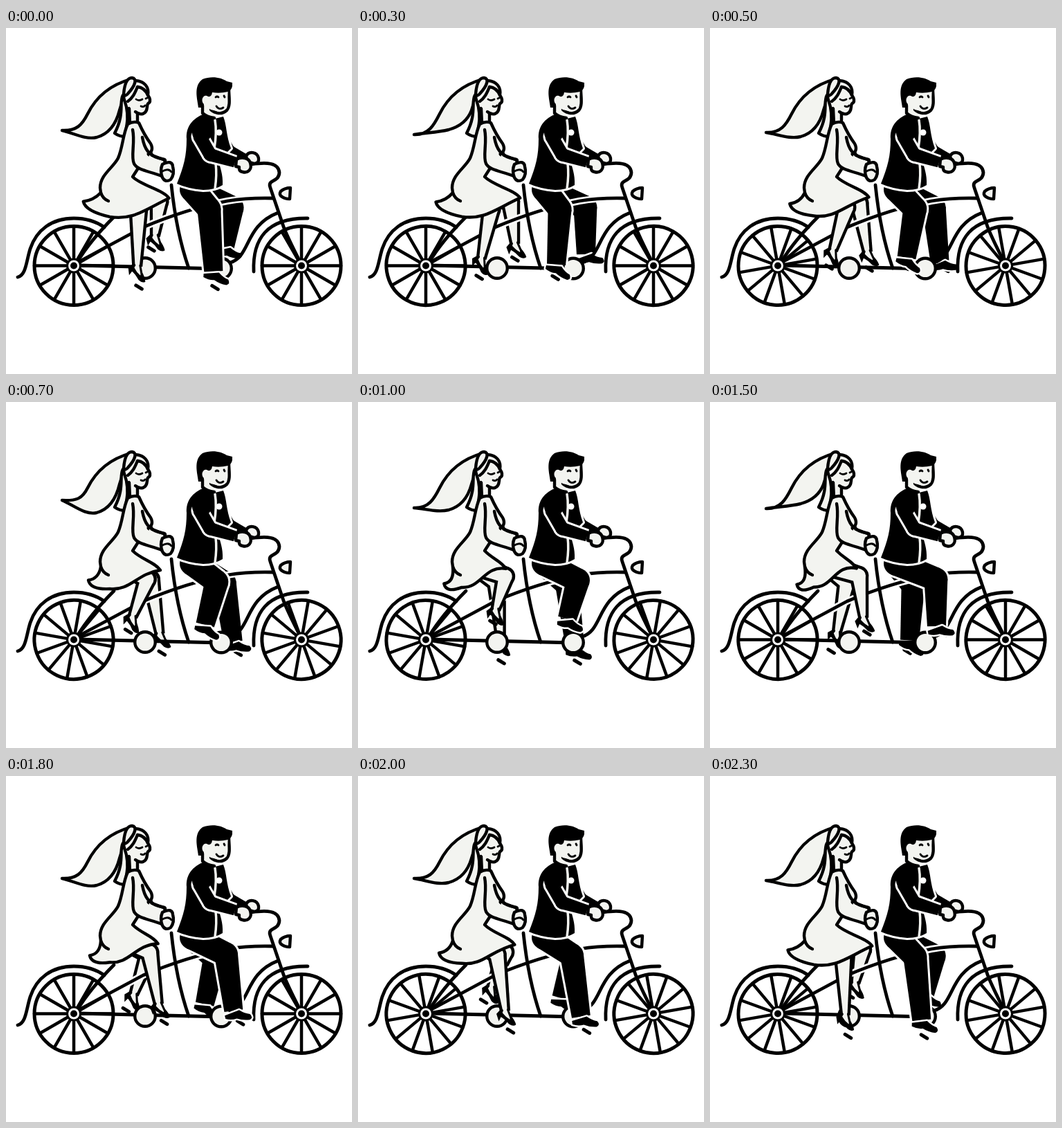
An HTML page with a canvas that plays this animation: 500x500 px, repeating every 2.4 s.

```html
<!DOCTYPE html>
<html lang="en">
<head>
<meta charset="utf-8">
<title>Tandem wedding ride</title>
<style>
html, body { margin: 0; width: 100%; height: 100%; overflow: hidden; background: #fff; }
canvas { display: block; width: 500px; height: 500px; }
</style>
</head>
<body>
<canvas id="stage" width="500" height="500"></canvas>
<script>
const ctx = document.getElementById('stage').getContext('2d');
const INK = '#000', PAPER = '#fff', CLOTH = '#f3f4f0', LINE = 4.4, TUBE = 4.8;
const STEP = 100, STEPS = 24, TURN = Math.PI * 2;
const REAR_HUB = [98, 343.5], FRONT_HUB = [427, 343.5];
const REAR_CRANK = [201, 347], FRONT_CRANK = [311, 347.5];

ctx.lineCap = ctx.lineJoin = 'round';

function fill(d, color) {
  ctx.fillStyle = color;
  ctx.fill(new Path2D(d));
}
function stroke(d, width = LINE, color = INK) {
  ctx.lineWidth = width;
  ctx.strokeStyle = color;
  ctx.stroke(new Path2D(d));
}
function shape(d, color, width) {
  fill(d, color);
  stroke(d, width);
}
function disc(x, y, r, color) {
  ctx.fillStyle = color;
  ctx.beginPath();
  ctx.arc(x, y, r, 0, TURN);
  ctx.fill();
}
function at(x, y, angle, draw) {
  ctx.save();
  ctx.translate(x, y);
  ctx.rotate(angle);
  draw();
  ctx.restore();
}

// Tapered chain of [x, y, radius] joints; the last end is cut flat.
function limb(joints, color, grow = 0) {
  ctx.fillStyle = color;
  for (let i = 0; i < joints.length - 1; i++) {
    const [x, y, r] = joints[i], [u, v, s] = joints[i + 1];
    const a = Math.atan2(v - y, u - x), nx = -Math.sin(a), ny = Math.cos(a);
    const p = r + grow, q = s + grow;
    ctx.beginPath();
    ctx.moveTo(x + nx * p, y + ny * p);
    ctx.lineTo(u + nx * q, v + ny * q);
    ctx.lineTo(u - nx * q, v - ny * q);
    ctx.lineTo(x - nx * p, y - ny * p);
    ctx.fill();
    disc(x, y, p, color);
  }
}

const pedalAngle = n => (108 + 15 * n) * Math.PI / 180;
const swing = (n, peak) => Math.cos((n - peak) * TURN / STEPS);

function pedal([x, y], a) {
  at(x + 29 * Math.cos(a), y + 29 * Math.sin(a), 0.55, () => stroke('M-5 0H5', 5));
}

function brideLeg(n, dx, dy) {
  const a = pedalAngle(n), k = swing(n, 13);
  const x = 200 + dx + 23 * Math.cos(a + 0.15), y = 323 + dy + 23 * Math.sin(a);
  const leg = [[172, 237, 16], [204 + dx + 13 * k, 256 - 6 * k, 14], [x, y, 7.5]];
  pedal(REAR_CRANK, a);
  limb(leg, INK);
  limb(leg, CLOTH, -LINE);
  at(x, y, -0.2 * Math.cos(a), () => {
    shape('M-4 -2L-8 5Q2 10 9 19L4 -2', CLOTH, 3);
    fill('M-7 -3L-13 2L-11 13L-7 7Q-1 12 3 19Q9 24 13 21Q12 14 7 7L5 13Q0 9 -7 -3Z', INK);
  });
}

function groomLeg(n, dx, dy) {
  const a = pedalAngle(n), k = swing(n, 14);
  const x = 307 + dx + 23 * Math.cos(a), y = 333 + dy + 20 * Math.sin(a);
  const leg = [[269, 233, 18], [309 + dx + 18 * k, 259 + dy - 3 * k, 17], [x, y, 13.5]];
  const shoe = 'M-14 4L8 1Q15 8 22 10Q26 16 20 18Q10 17 2 12Q-6 13 -14 9Z';
  pedal(FRONT_CRANK, a);
  limb(leg, PAPER, 3);
  limb(leg, INK);
  at(x, y, -0.24 * Math.cos(a), () => {
    stroke(shoe, 5, PAPER);
    fill(shoe, INK);
  });
}

function wheel([x, y], n) {
  at(x, y, n * TURN / 36, () => {
    for (let i = 0; i < 6; i++) {
      const c = 57 * Math.cos(i * TURN / 12), s = 57 * Math.sin(i * TURN / 12);
      stroke(`M${-c} ${-s}L${c} ${s}`, 4.5);
    }
    ctx.lineWidth = 5;
    ctx.beginPath();
    ctx.arc(0, 0, 57, 0, TURN);
    ctx.stroke();
  });
}
function hub([x, y]) {
  disc(x, y, 11, INK);
  disc(x, y, 8, PAPER);
  disc(x, y, 5, INK);
}
function ring([x, y]) {
  disc(x, y, 17, INK);
  disc(x, y, 12.6, CLOTH);
}

function bike(n) {
  const tube = 'M103 339L198 288Q262 261 320 250Q350 245 386 246';
  stroke(tube, 10, PAPER);
  wheel(REAR_HUB, n);
  wheel(FRONT_HUB, n);
  stroke(tube, TUBE);
  stroke('M103 338Q122 307 156 273', TUBE);
  stroke('M104 343L312 348', TUBE);
  stroke('M239 227Q246 295 264 347', TUBE);
  stroke('M17 360C29 357 29 338 35 319C44 292 66 275 98 275Q124 275 142 288', TUBE);
  stroke('M358 352C356 305 377 274 436 275', TUBE);
  stroke('M324 339C354 330 344 286 393 267', TUBE);
  stroke('M354 197C376 194 394 194 395 209C394 224 377 218 382 231L400 284Q404 297 427 342', TUBE);
  shape('M397 236Q403 231 411 231L410 247Q403 247 399 244Q394 241 397 236Z', CLOTH);
  hub(REAR_HUB);
  hub(FRONT_HUB);
  ring(REAR_CRANK);
  ring(FRONT_CRANK);
}

function veil(n) {
  const i = n % 6;
  const tip = [148, 142, 148, 154, 153, 151][i];
  const belly = [158, 160, 154, 147, 156, 157][i];
  shape(`M180 74C144 84 127 106 118 124C110 140 102 ${tip + 1} 81 ${tip}
    C98 ${tip + (belly - tip) * 0.4} 115 ${belly + 4} 131 ${belly}Q156 ${belly - 7} 164 119L172 94Z`, CLOTH);
  shape('M169 97C163 108 172 124 157 152Q164 157 172 157C173 144 178 134 174 114Z', CLOTH);
}

function bride(n) {
  const c = swing(n, 1);
  const tx = 119 - 7.5 * c, ty = 257.5 - 7 * c;
  const ex = 223 + 13 * c, ey = 243 + 3 * c;

  veil(n);
  // far arm
  shape('M203 166L211 184L230 191L229 201L205 193Z', CLOTH);
  // neck and dress
  fill('M178 116L179 140L192 140L190 120Z', CLOTH);
  stroke('M178 116L179 138M190 122L190 138');
  const front = `M${ex} ${ey}C${ex - 8} ${ey - 12} 196 228 183 215`;
  const back = `L203 184Q215 178 209 167Q200 155 192 137Q184 134 176 139
    C169 152 169 172 162 188C155 202 136 212 136 231L137 238`;
  const hem = `Q${tx + 15} ${ty - 2} ${tx} ${ty}Q${tx + 3} ${ty + 14} 150 ${270 + 3 * c}
    C${180 + 3 * c} ${273 + 5 * c} ${189 + 9 * c} ${248 + 17 * c} ${ex} ${ey}`;
  shape(front + back + hem, CLOTH);
  stroke('M137 238Q140 247 148 250');
  // near arm
  fill('M183 148L184 185Q184 202 198 205L225 214L229 194Q211 190 204 184L195 152Z', CLOTH);
  stroke('M183 147C187 165 180 186 185 196C190 206 208 207 225 214M197 158C200 174 205 186 229 190L231 199');
  shape('M226 197Q240 190 241 200Q244 211 238 219Q230 224 226 216Q222 206 226 197Z', CLOTH);
  stroke('M226 207Q235 202 239 208', 3);
  // head
  shape('M204 92Q205 96 205 98Q210 104 207 108Q204 109 204 114C203 125 195 127 187 121L176 112L177 98L188 82', CLOTH, 0.01);
  stroke('M205 97Q210 104 207 108Q204 109 204 114C203 125 195 127 187 121');
  shape('M187 76C201 77 207 86 205 97Q200 86 190 85C186 95 183 101 176 106', CLOTH);
  shape('M170 96C171 83 174 72 182 72C190 73 187 83 176 95Q173 99 170 96Z', CLOTH);
  stroke('M188 103Q192 106 197 103M202 102L204 101', 2.8);
  stroke('M195 113Q199 115 201 112', 2.8);
}

function groom() {
  const jacket = `M284 125C266 133 260 146 261 160C261 185 257 200 247 225Q262 232 285 234Q302 234 313 227
    C314 212 309 200 307 192L325 174C318 155 319 140 314 128L302 131Z`;
  const arm = [[280, 157, 9.5], [295, 183, 9.5], [331, 194, 7.5]];

  shape('M347 185C351 177 363 179 365 188Q366 195 359 196L349 193Z', CLOTH);
  limb([[314, 158, 6], [323, 177, 8], [346, 187, 5]], INK);
  stroke(jacket, 6, PAPER);
  fill(jacket, INK);
  stroke('M302 133Q305 150 301 174M303 196Q305 212 302 232', 3.5, CLOTH);
  disc(308, 151, 4.5, PAPER);
  limb(arm, PAPER, 3);
  limb(arm, INK);
  disc(283, 151, 14, INK);
  shape('M333 190C341 185 351 188 353 195C356 204 350 210 342 208Q336 207 337 201L332 200Z', CLOTH);

  // collar and head
  fill('M284 110L284 125L301 132L303 119Z', CLOTH);
  stroke('M284 112L284 123Q291 129 301 130');
  shape('M322 88C322 100 325 112 319 119C311 126 302 123 296 118', CLOTH);
  fill('M283 100L296 88L321 88L319 116L308 121L296 118L286 111Z', CLOTH);
  fill(`M278 115C277 104 270 84 284 74C296 69 311 71 319 77L327 79Q328 89 321 92Q309 95 298 93
    Q297 100 292 99C286 94 280 104 286 110L283 115Z`, INK);
  stroke('M303 100Q305 98 307 100M315 98L316 100', 2.8);
  stroke('M304 113Q308 119 314 115', 2.8);
}

function draw(now) {
  const n = Math.floor(now / STEP) % STEPS, far = n + STEPS / 2;
  ctx.fillStyle = PAPER;
  ctx.fillRect(0, 0, 500, 500);
  brideLeg(far, 5, 0);
  groomLeg(far, 2, 3);
  bike(n);
  brideLeg(n, 0, 0);
  groomLeg(n, 0, 0);
  bride(n);
  groom();
}

const start = performance.now();
function tick() {
  draw(performance.now() - start);
  requestAnimationFrame(tick);
}
tick();
</script>
</body>
</html>
```
